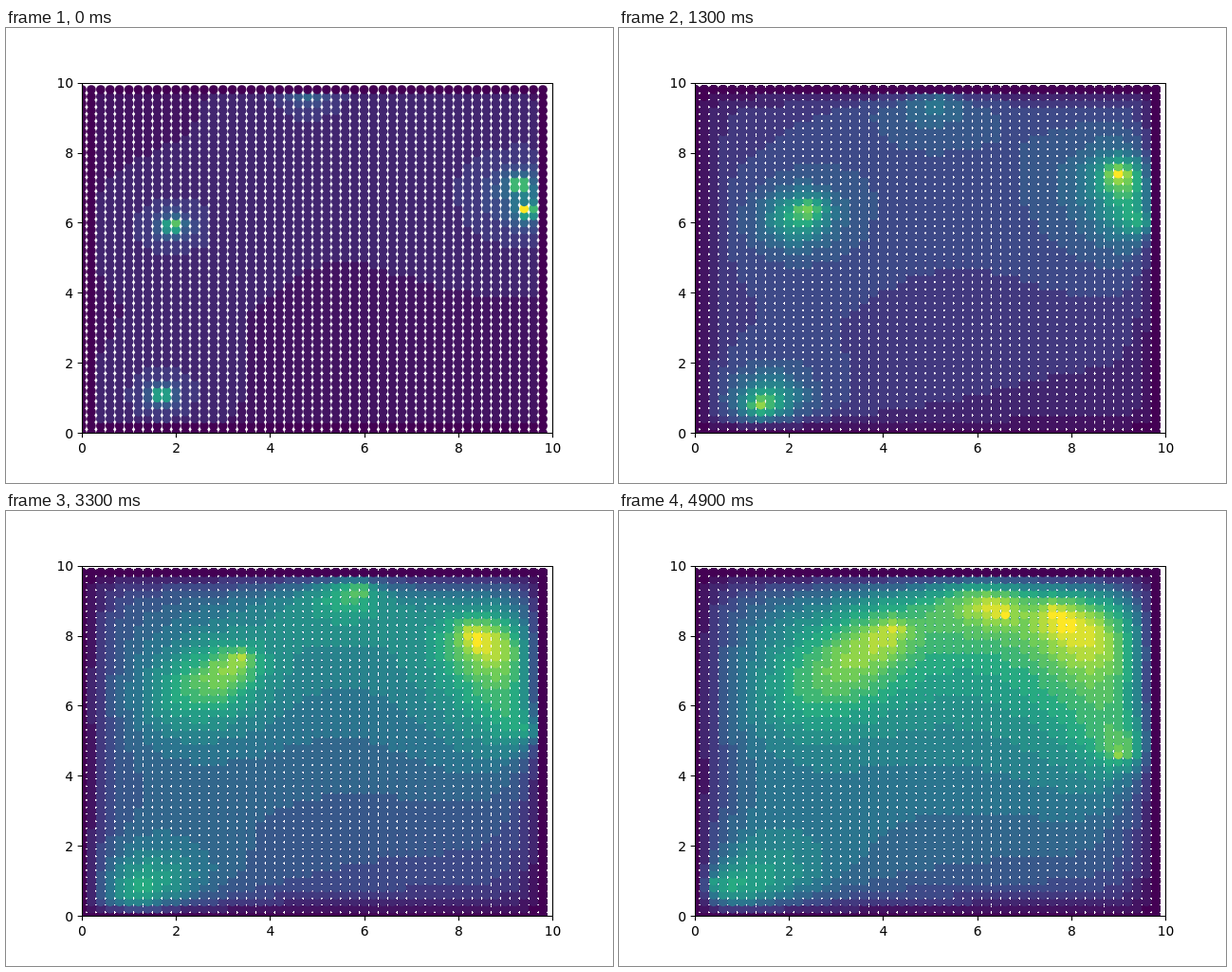
Animation, 640 px wide and 480 px high, one loop 5000 ms. Source, as an HTML page with a canvas:

```html
<!DOCTYPE html>
<html lang="en">
<head>
<meta charset="utf-8">
<title>Moving heat sources</title>
<style>
html, body { margin: 0; width: 100%; height: 100%; overflow: hidden; background: #fff; }
canvas, svg { position: absolute; left: 0; top: 0; width: 640px; height: 480px; display: block; }
text { font: 13.89px "DejaVu Sans", sans-serif; fill: #000; }
path { fill: none; stroke: #000; stroke-width: 1.11; }
</style>
</head>
<body>
<canvas id="plot" width="640" height="480"></canvas>
<svg id="axes" viewBox="0 0 640 480"></svg>
<script>
const W = 640, H = 480, N = 50, CELL = 0.2;
const FRAMES = 50, FRAME_MS = 100;
const LEFT = 80, RIGHT = 576, TOP = 57.6, BOTTOM = 427.2;
const RADIUS = 4.861;      // marker radius including its edge
const SPREAD = 0.2;        // diffusion per step
const NEAREST = 0.06;      // limits the 1/r peak
const LEVELS = 18;

const px = x => LEFT + x * (RIGHT - LEFT) / 10;
const py = y => BOTTOM - y * (BOTTOM - TOP) / 10;

// Start, velocity and bend of each source; one loop is one unit of time
const SOURCES = [
  { start: [1.92, 5.92], speed: [2.1, 2], bend: [0.28, 0.33] },
  { start: [1.7, 1.1], speed: [-1.3, -1.1], bend: [0, -1] },
  { start: [4.8, 9.85], speed: [1.5, 0], bend: [0.25, -1.2] },
  { start: [9.3, 7.1], speed: [-1.1, 1.2], bend: [-0.65, 0.45] },
  { start: [9.47, 6.35], speed: [1.4, -1.3], bend: [-1.82, -0.45] }
];

// Sources bounce off the lower and left walls
const position = ({ start, speed, bend }, s) =>
  start.map((p, i) => Math.abs(p + speed[i] * s + bend[i] * s * s));

// Viridis, rounded to a few levels
const STOPS = ["440154", "414487", "2a788e", "22a884", "7ad151", "fde725"]
  .map(h => [0, 2, 4].map(i => parseInt(h.slice(i, i + 2), 16)));

function viridis(v) {
  const s = v * (STOPS.length - 1);
  const i = Math.min(Math.floor(s), STOPS.length - 2);
  const rgb = STOPS[i].map((c, k) => Math.round(c + (STOPS[i + 1][k] - c) * (s - i)));
  return `rgb(${rgb})`;
}
const PALETTE = Array.from({ length: LEVELS + 1 }, (_, i) => viridis(i / LEVELS));

function makeCanvas() {
  const c = document.createElement("canvas");
  c.width = W;
  c.height = H;
  return c;
}

let heat = new Float64Array(N * N);

function diffuse() {
  const next = new Float64Array(N * N);
  for (let i = 1; i < N - 1; i++) {
    for (let j = 1; j < N - 1; j++) {
      const k = i * N + j, u = heat;
      next[k] = u[k] + SPREAD * (u[k - 1] + u[k + 1] + u[k - N] + u[k + N] - 4 * u[k]);
    }
  }
  heat = next;
}

function addHeat(step) {
  for (const source of SOURCES) {
    const [x, y] = position(source, step / (FRAMES - 1));
    for (let i = 2; i < N - 1; i++) {
      for (let j = 2; j < N - 1; j++) {
        const r = Math.hypot(i * CELL - x, j * CELL - y);
        heat[i * N + j] += 1 / Math.max(r, NEAREST);
      }
    }
  }
}

// Every step paints over the earlier ones, so the gaps slowly close
const sheet = makeCanvas().getContext("2d", { willReadFrequently: true });
sheet.fillStyle = "#fff";
sheet.fillRect(0, 0, W, H);
sheet.beginPath();
sheet.rect(LEFT, TOP, RIGHT - LEFT, BOTTOM - TOP);
sheet.clip();

function paintDots() {
  const max = heat.reduce((a, b) => Math.max(a, b), 0);
  for (let i = 0; i < N; i++) {
    for (let j = 0; j < N; j++) {
      sheet.fillStyle = PALETTE[Math.round(heat[i * N + j] / max * LEVELS)];
      sheet.beginPath();
      sheet.arc(px(i * CELL), py(j * CELL), RADIUS, 0, 2 * Math.PI);
      sheet.fill();
    }
  }
}

function makePicture(step) {
  diffuse();
  addHeat(step);
  paintDots();
  const copy = makeCanvas();
  copy.getContext("2d").drawImage(sheet.canvas, 0, 0);
  return copy;
}

function drawAxes() {
  const snap = v => Math.floor(v + 0.5) + 0.5;
  const l = snap(LEFT), r = snap(RIGHT), t = snap(TOP), b = snap(BOTTOM);
  let d = `M${l} ${t}H${r}V${b}H${l}Z`, labels = "";
  for (let v = 0; v <= 10; v += 2) {
    d += `M${snap(px(v))} ${b}v4.86M${l} ${snap(py(v))}h-4.86`;
    labels += `<text x="${px(v) + 0.5}" y="448" text-anchor="middle">${v}</text>` +
      `<text x="71.2" y="${Math.round(py(v) + 5.5)}" text-anchor="end">${v}</text>`;
  }
  document.getElementById("axes").innerHTML = `<path d="${d}"/>${labels}`;
}

const view = document.getElementById("plot").getContext("2d");
let shown = -1;

function render(ms) {
  const n = Math.floor(ms / FRAME_MS) % FRAMES;
  if (n !== shown) {
    view.drawImage(pictures[n], 0, 0);
    shown = n;
  }
}

function tick() {
  render(performance.now() - start);
  requestAnimationFrame(tick);
}

drawAxes();
const pictures = Array.from({ length: FRAMES }, (_, step) => makePicture(step));
const start = performance.now();
tick();
</script>
</body>
</html>
```
